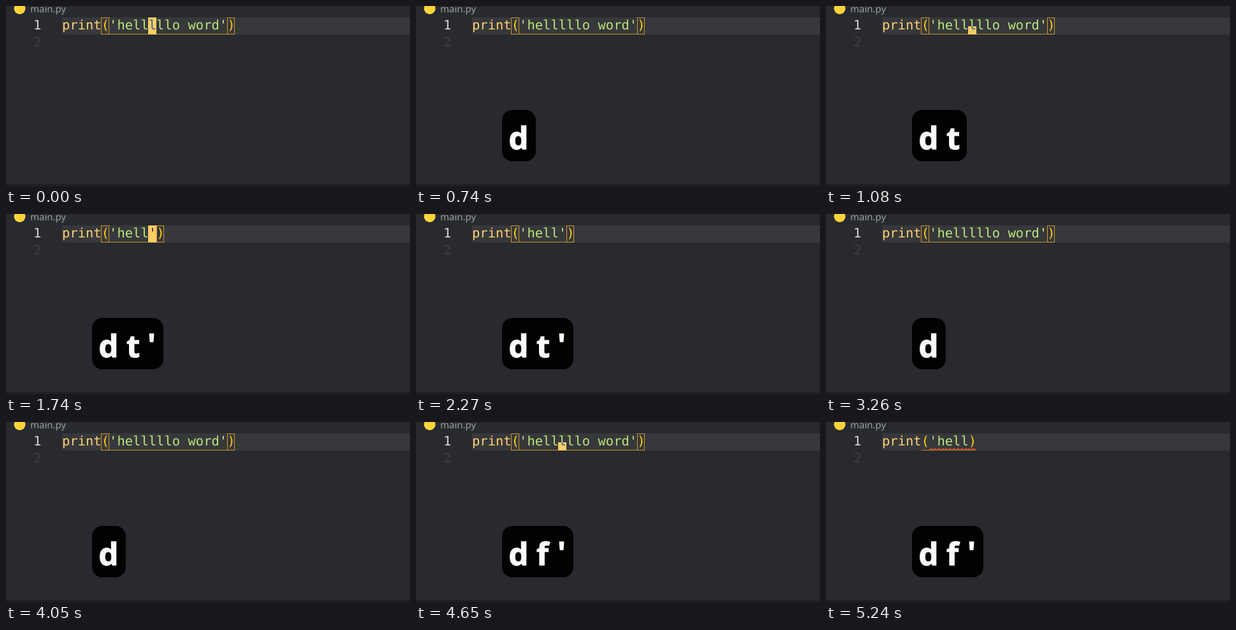
Recreate the animation shown at these times as an HTML page. Size 634 by 284 pixels, loop 5.51 s.

```html
<!DOCTYPE html>
<html lang="en">
<head>
<meta charset="utf-8">
<title>Deleting inside quotes</title>
<style>
  html, body { margin: 0; width: 100%; height: 100%; overflow: hidden; background: #292a2f; }
  svg { display: block; width: 634px; height: 284px; }
  text { text-rendering: geometricPrecision; white-space: pre; }
  .mono { font: 20.5px "DejaVu Sans Mono", monospace; }
  .tab { font: 15px "Noto Sans", sans-serif; fill: #98a09f; }
  .keys { font: bold 49px "Noto Sans", sans-serif; fill: #fafafa; stroke: #fafafa; stroke-width: 1.2; }
  .name { fill: #ffd173; }
  .paren { fill: #ffd012; }
  .string { fill: #bae67e; }
  .match { fill: none; stroke: #d0982a; }
</style>
</head>
<body>
<svg viewBox="0 0 634 284">
  <rect width="634" height="284" fill="#292a2f"/>
  <rect y="280" width="634" height="4" fill="#231f23"/>
  <circle cx="21.5" cy="4" r="9" fill="#ffd43b"/>
  <text class="tab" x="38" y="10">main.py</text>

  <rect x="88" y="18" width="546" height="27" fill="#37383b"/>
  <text class="mono" x="43" y="37" fill="#d4d6d0">1</text>
  <text class="mono" x="43" y="64" fill="#3d3e43">2</text>

  <rect id="guide" x="149" y="44" height="1" fill="#b5950f"/>
  <g id="boxes" class="match">
    <rect x="149.5" y="18.5" width="12" height="26"/>
    <rect id="closeBox" y="18.5" width="11" height="26"/>
  </g>
  <text class="mono" x="88" y="37"><tspan class="name">print</tspan><tspan class="paren">(</tspan><tspan id="string" class="string"></tspan><tspan class="paren">)</tspan></text>
  <path id="squiggle" fill="none" stroke="#f0513c" stroke-width="1.2"/>

  <clipPath id="cursorClip"><rect id="clipRect" x="223" width="13"/></clipPath>
  <g id="cursor" clip-path="url(#cursorClip)">
    <rect x="223" y="18" width="13" height="27" fill="#ffcc66"/>
    <text id="cursorChar" class="mono" x="223.7" y="37"></text>
  </g>

  <g id="overlay">
    <rect id="panel" x="135" y="164" height="81" rx="16" fill="#020202"/>
    <text class="keys" y="225.5"><tspan x="145.5">d</tspan><tspan id="key2" x="189"></tspan><tspan id="key3" x="222" y="223.5"></tspan></text>
  </g>
</svg>
<script>
const LOOP = 5510, LEFT = 88, CELL = 12.34, CURSOR_COL = 11;
const PANEL_WIDTHS = [0, 53, 86, 112];
const LONG = "'helllllo word'", SHORT = "'hell'", OPEN = "'hell";
const $ = id => document.getElementById(id);

// Each step changes only the listed parts of the state.
const steps = [
  [0, { string: LONG, keys: "", cursor: "full", match: true, error: false }],
  [330, { cursor: "off" }],
  [740, { keys: "d" }],
  [810, { cursor: "full" }],
  [1080, { keys: "dt", cursor: "half" }],
  [1740, { keys: "dt'", string: SHORT, cursor: "full" }],
  [2270, { cursor: "off" }],
  [2730, { cursor: "full" }],
  [2930, { cursor: "off" }],
  [3260, { keys: "d", string: LONG }],
  [3590, { cursor: "full" }],
  [4050, { cursor: "off" }],
  [4120, { keys: "df" }],
  [4190, { cursor: "half" }],
  [4650, { keys: "df'" }],
  [4720, { string: OPEN, cursor: "full" }],
  [4780, { match: false }],
  [4980, { error: true }],
  [5240, { cursor: "off" }]
];

const show = (id, on) => $(id).setAttribute("visibility", on ? "visible" : "hidden");

$("squiggle").setAttribute("d", "M162 44.3" + "l3 -2.6l3 2.6".repeat(12) + "l2 -1.8");

function draw({ string, keys, cursor, match, error }) {
  const closeCol = 6 + string.length;
  const closeX = Math.floor(LEFT + closeCol * CELL);
  $("string").textContent = string;
  $("guide").setAttribute("width", Math.floor(closeX + CELL) - 149);
  $("closeBox").setAttribute("x", closeX + 0.5);
  $("closeBox").setAttribute("width", 11);
  show("boxes", match);
  show("squiggle", error);

  const char = `print(${string})`[CURSOR_COL];
  const top = cursor === "half" ? 32 : 18;
  $("cursorChar").textContent = char;
  $("cursorChar").setAttribute("fill", char === "l" ? "#24699a" : "#3b2a3c");
  $("clipRect").setAttribute("y", top);
  $("clipRect").setAttribute("height", 45 - top);
  show("cursor", cursor !== "off");

  $("panel").setAttribute("width", PANEL_WIDTHS[keys.length]);
  $("key2").textContent = keys[1] || "";
  $("key3").textContent = keys[2] || "";
  show("overlay", keys);
}

let last = -1;
const start = performance.now();

function tick() {
  const time = (performance.now() - start) % LOOP;
  const past = steps.filter(([at]) => at <= time);
  if (past.length !== last) {
    last = past.length;
    draw(Object.assign({}, ...past.map(([, change]) => change)));
  }
  requestAnimationFrame(tick);
}
tick();
</script>
</body>
</html>
```
